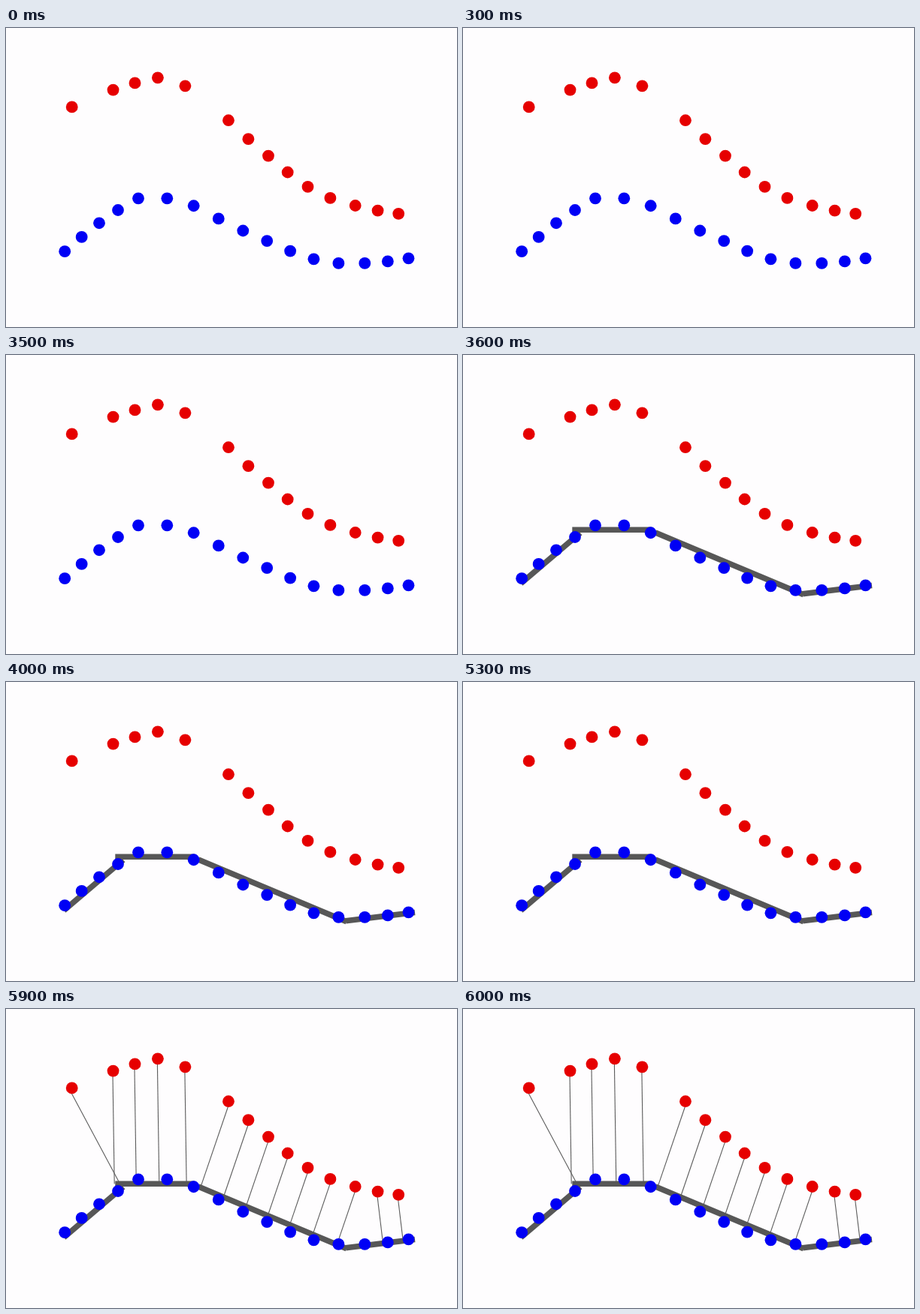
An HTML page for the animation above (8000 ms loop, 600x399 px).

```html
<!DOCTYPE html>
<html lang="en">
<head>
<meta charset="utf-8">
<title>Piecewise fit</title>
<style>
  html, body { margin: 0; width: 100%; height: 100%; overflow: hidden; background: #fefdfe; }
  svg { display: block; width: 600px; height: 399px; }
  #bars { stroke: #575757; stroke-width: 7.6; }
  #links { stroke: #5c5c5c; stroke-width: 1.1; }
</style>
</head>
<body>
<svg viewBox="0 0 600 399">
  <g id="links" visibility="hidden"></g>
  <g id="bars" visibility="hidden"></g>
  <g id="red" fill="#e60000"></g>
  <g id="blue" fill="#0000f5"></g>
</svg>
<script>
const LOOP = 8000, BARS_AT = 3600, LINKS_AT = 5800;
const DOTS = 16, RADIUS = 7.9, GAPS = [1, 6];

// Dots follow a smooth curve through these key points; KEYS says which dot each one is.
const KEYS = [0, 3, 4, 5, 8, 12, 13, 15];
const redKeys = {
  x: [87.7, 171.5, 201.9, 238.4, 322.4, 431.4, 464.7, 522.2],
  y: [105.4, 73.4, 66.3, 77.3, 148.2, 226.9, 237, 247.8]
};
const blueKeys = {
  x: [78.2, 149, 176, 214.3, 315.3, 442.4, 477.3, 535.5],
  y: [298.2, 243, 227.3, 227.3, 270.5, 313.9, 313.9, 307.3]
};

// lean: sideways travel of a link per pixel down to this bar.
const bars = [
  { x1: 77, y1: 304.8, x2: 156, y2: 237.4, lean: 0.533 },
  { x1: 145.3, y1: 233.3, x2: 251, y2: 233.3, lean: 0.015 },
  { x1: 256, y1: 237, x2: 453, y2: 319.8, lean: -0.34 },
  { x1: 452, y1: 318.8, x2: 544, y2: 307.5, lean: 0.12 }
];

// Cubic Hermite curve over unevenly spaced keys.
function curve(v) {
  const last = KEYS.length - 1;
  const gap = k => KEYS[k + 1] - KEYS[k];
  const slope = k => (v[k + 1] - v[k]) / gap(k);
  function tangent(k) {
    if (k === 0) return (3 * slope(0) - tangent(1)) / 2;
    if (k === last) return (3 * slope(k - 1) - tangent(k - 1)) / 2;
    return (gap(k) * slope(k - 1) + gap(k - 1) * slope(k)) / (gap(k - 1) + gap(k));
  }
  return i => {
    const k = Math.min(KEYS.findLastIndex(n => n <= i), last - 1);
    const h = gap(k), t = (i - KEYS[k]) / h, u = 1 - t;
    return v[k] * u * u * (1 + 2 * t) + v[k + 1] * t * t * (1 + 2 * u)
      + h * t * u * (tangent(k) * u - tangent(k + 1) * t);
  };
}

function dots({ x, y }) {
  const cx = curve(x), cy = curve(y);
  return Array.from({ length: DOTS }, (_, i) => ({ cx: cx(i), cy: cy(i), r: RADIUS }));
}

// A link runs from the bottom of a dot to the first bar it can reach.
function link({ cx, cy }) {
  const x1 = cx - 0.5, y1 = cy + 7;
  for (const bar of bars) {
    const slope = (bar.y2 - bar.y1) / (bar.x2 - bar.x1);
    const base = bar.y1 - slope * bar.x1;
    const x2 = (x1 + bar.lean * (base - y1)) / (1 - bar.lean * slope);
    if (x2 <= bar.x2) return { x1, y1, x2, y2: base + slope * x2 };
  }
}

const group = id => document.getElementById(id);

function add(id, tag, attrs) {
  const el = document.createElementNS("http://www.w3.org/2000/svg", tag);
  for (const key in attrs) el.setAttribute(key, attrs[key]);
  group(id).append(el);
}

const red = dots(redKeys).filter((_, i) => !GAPS.includes(i));
red.forEach(d => { add("red", "circle", d); add("links", "line", link(d)); });
dots(blueKeys).forEach(d => add("blue", "circle", d));
bars.forEach(({ x1, y1, x2, y2 }) => add("bars", "line", { x1, y1, x2, y2 }));

const show = (id, on) => group(id).setAttribute("visibility", on ? "visible" : "hidden");

function draw() {
  const t = performance.now() % LOOP;
  show("bars", t >= BARS_AT);
  show("links", t >= LINKS_AT);
  requestAnimationFrame(draw);
}
draw();
</script>
</body>
</html>
```
